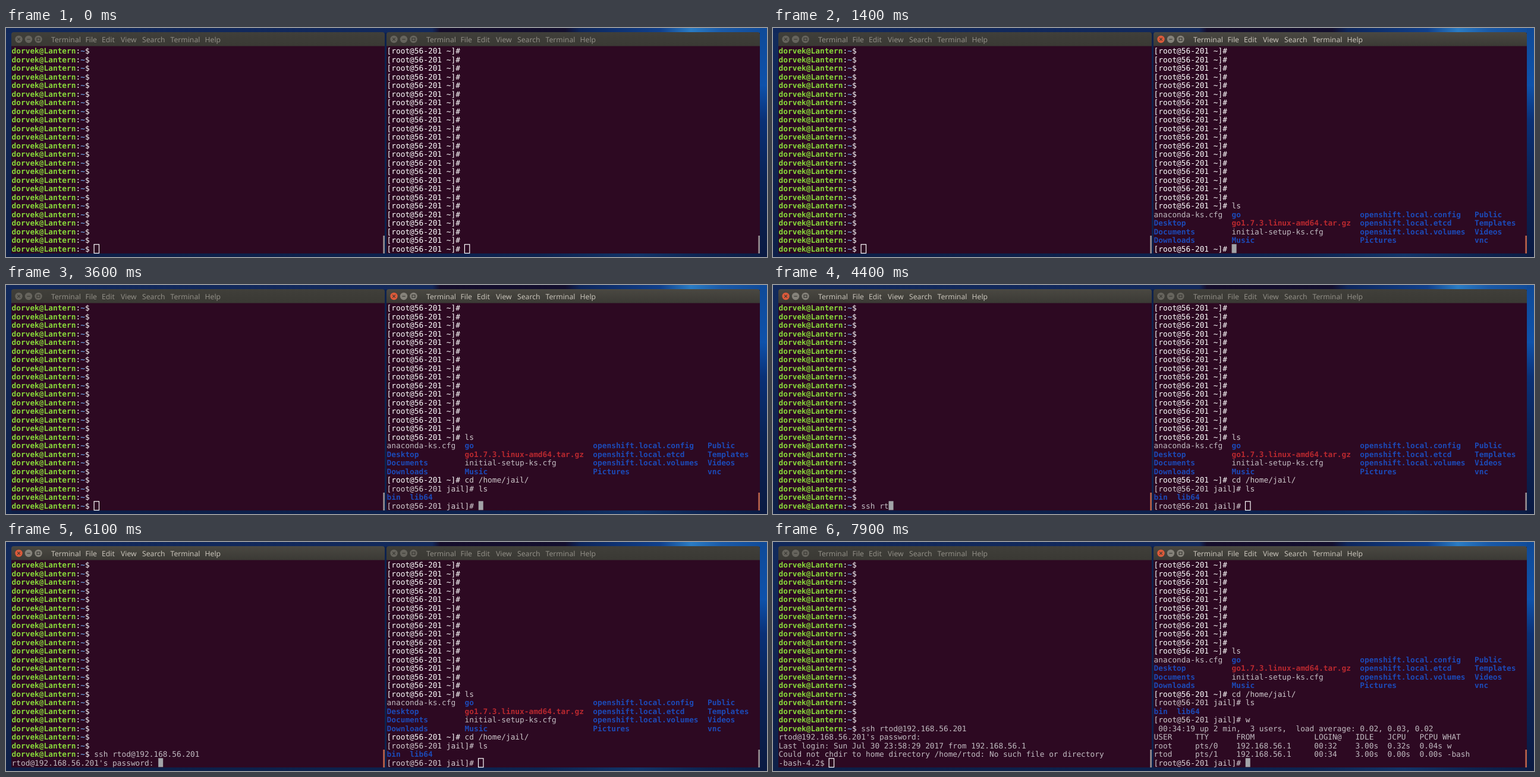
Recreate the animation shown at these times as an HTML page with a canvas. Size 1280 by 386 pixels, loop 8000 ms.

```html
<!DOCTYPE html>
<html lang="en">
<head>
<meta charset="utf-8">
<title>Two terminals</title>
<style>
  html, body { margin: 0; width: 100%; height: 100%; overflow: hidden; background: #0d1e46; }
  canvas { display: block; }
</style>
</head>
<body>
<canvas id="stage" width="1280" height="386"></canvas>
<script>
const ctx = document.getElementById('stage').getContext('2d');
const LOOP = 8000, ROWS = 24, CELL = 7.706, LINE = 14.49;
const MONO = '"DejaVu Sans Mono", monospace';
const WHITE = '#ffffff', GRAY = '#c2bcc2', GREEN = '#88d83a', TILDE = '#6a94cc';
const BLUE = '#1c4ab8', RED = '#b8282f';
const USER = 'dorvek', HOST = 'Lantern', GUEST = 'rtod';

// A terminal line is a list of runs placed on the character grid.
const run = (text, color = GRAY, col = 0, bold = false) => ({ text, color, col, bold });
const dir = (text, col) => run(text, BLUE, col, true);

function localPrompt(command = '') {
  const name = `${USER}@${HOST}`, n = name.length;
  return [run(name, GREEN, 0, true), run(':', WHITE, n), run('~', TILDE, n + 1, true),
          run('$', WHITE, n + 2), run(command, GRAY, n + 4)];
}

function rootPrompt(place = '~', command = '') {
  const text = `[root@56-201 ${place}]# `;
  return [run(text, place === '~' ? WHITE : '#d6cfd3'), run(command, '#d0cacd', text.length)];
}

const shellPrompt = () => [run('-bash-4.2$ ')];

const homeListing = [
  [run('anaconda-ks.cfg'), dir('go', 17), dir('openshift.local.config', 45), dir('Public', 70)],
  [dir('Desktop', 0), run('go1.7.3.linux-amd64.tar.gz', RED, 17, true), dir('openshift.local.etcd', 45), dir('Templates', 70)],
  [dir('Documents', 0), run('initial-setup-ks.cfg', GRAY, 17), dir('openshift.local.volumes', 45), dir('Videos', 70)],
  [dir('Downloads', 0), dir('Music', 17), dir('Pictures', 45), dir('vnc', 70)]
];
const jailListing = [[dir('bin', 0), dir('lib64', 5)]];
const sessions = [
  ' 00:34:19 up 2 min,  3 users,  load average: 0.02, 0.03, 0.02',
  'USER     TTY      FROM             LOGIN@   IDLE   JCPU   PCPU WHAT',
  'root     pts/0    192.168.56.1     00:32    3.00s  0.32s  0.04s w',
  `${GUEST}     pts/1    192.168.56.1     00:34    3.00s  0.00s  0.00s -bash`
].map(text => [run(text)]);
const passwordLine = [run(`${GUEST}@192.168.56.201's password: `)];
const welcome = [
  'Last login: Sun Jul 30 23:58:29 2017 from 192.168.56.1',
  `Could not chdir to home directory /home/${GUEST}: No such file or directory`
].map(text => [run(text)]);

// Commands are typed from `start` to `end`; the output follows at `enter`.
const rightSteps = [
  { prompt: c => rootPrompt('~', c), command: 'ls', start: 1000, end: 1200, enter: 1300, output: homeListing },
  { prompt: c => rootPrompt('~', c), command: 'cd /home/jail/', start: 1700, end: 2700, enter: 2900, output: [] },
  { prompt: c => rootPrompt('jail', c), command: 'ls', start: 3100, end: 3300, enter: 3400, output: jailListing },
  { prompt: c => rootPrompt('jail', c), command: 'w', start: 7500, end: 7600, enter: 7700, output: sessions },
  { prompt: c => rootPrompt('jail', c), command: '', start: LOOP, end: LOOP, enter: LOOP }
];
const leftSteps = [
  { prompt: localPrompt, command: `ssh ${GUEST}@192.168.56.201`, start: 4200, end: 5100, enter: 5400, output: [] },
  { prompt: () => passwordLine, command: '', start: 5400, end: 5400, enter: 6400, output: welcome },
  { prompt: shellPrompt, command: '', start: LOOP, end: LOOP, enter: LOOP }
];

function typed({ command, start, end }, t) {
  if (t < start) return '';
  if (t >= end) return command;
  return command.slice(0, 1 + Math.floor((t - start) / (end - start) * command.length));
}

function screenAt(steps, idlePrompt, t) {
  const lines = Array.from({ length: ROWS - 1 }, () => idlePrompt());
  for (const step of steps) {
    lines.push(step.prompt(typed(step, t)));
    if (t < step.enter) break;
    lines.push(...step.output);
  }
  return lines.slice(-ROWS);
}

function gradient(x0, y0, x1, y1, stops) {
  const g = ctx.createLinearGradient(x0, y0, x1, y1);
  stops.forEach(([at, color]) => g.addColorStop(at, color));
  return g;
}

function rect(x, y, w, h, fill) {
  ctx.fillStyle = fill;
  ctx.fillRect(x, y, w, h);
}

function drawDesktop() {
  rect(0, 0, 1280, 386, gradient(0, 0, 1280, 0, [
    [0, '#0d1e46'], [0.7, '#0d2350'], [0.83, '#113468'], [0.92, '#0d2350'], [1, '#0b1c44']]));
  rect(0, 0, 10, 386, gradient(0, 0, 0, 386, [[0, '#122a5c'], [1, '#0e2048']]));
  rect(0, 0, 1280, 8, gradient(0, 0, 1280, 0, [
    [0, '#11285a'], [0.56, '#12295c'], [0.57, '#150d2b'], [0.735, '#130f2e'],
    [0.755, '#0d265c'], [0.86, '#10408c'], [0.9, '#2a7cc4'], [0.94, '#1a5aa8'], [1, '#0f4a98']]));
  rect(1268, 0, 12, 386, gradient(0, 0, 0, 386, [
    [0, '#0f4a98'], [0.25, '#0e52ab'], [0.4, '#0a3177'], [0.65, '#0a2458'], [1, '#0a1a42']]));
}

function drawButtons(x, active) {
  const dark = '#3a3934';
  [12.5, 29, 45.5].forEach((dx, i) => {
    const cx = x + dx, cy = 19;
    ctx.fillStyle = active ? (i ? '#85827a' : '#dc5a3a') : '#66645d';
    ctx.beginPath();
    ctx.arc(cx, cy, 6.2, 0, Math.PI * 2);
    ctx.fill();
    ctx.strokeStyle = dark;
    ctx.lineWidth = 1.2;
    ctx.beginPath();
    if (i === 0) {
      ctx.moveTo(cx - 2.3, cy - 2.3); ctx.lineTo(cx + 2.3, cy + 2.3);
      ctx.moveTo(cx + 2.3, cy - 2.3); ctx.lineTo(cx - 2.3, cy + 2.3);
    } else if (i === 1) {
      ctx.moveTo(cx - 2.7, cy); ctx.lineTo(cx + 2.7, cy);
    } else {
      ctx.rect(cx - 2.5, cy - 2.2, 5, 4.4);
    }
    ctx.stroke();
  });
}

const menu = [['Terminal', 67], ['File', 124.5], ['Edit', 152], ['View', 184],
              ['Search', 220], ['Terminal', 267.5], ['Help', 325.5]];

function drawCursor(x, y, active) {
  if (active) return rect(x, y, 8, 15, '#a2a4a8');
  ctx.strokeStyle = WHITE;
  ctx.lineWidth = 1.2;
  ctx.strokeRect(x - 0.2, y + 0.5, 8.4, 14.8);
}

function drawTitleBar(x, active) {
  ctx.fillStyle = gradient(0, 7, 0, 30, active
    ? [[0, '#4a4842'], [1, '#3b3a35']] : [[0, '#403f3a'], [1, '#3a3934']]);
  ctx.beginPath();
  ctx.roundRect(x, 7, 628, 23.5, [4, 4, 0, 0]);
  ctx.fill();
  drawButtons(x, active);
  ctx.font = '12.2px "Noto Sans", sans-serif';
  ctx.fillStyle = active ? '#c8c3b9' : '#918e86';
  menu.forEach(([label, dx]) => ctx.fillText(label, x + dx, 24));
}

function drawWindow(x, lines, active) {
  rect(x, 30, 628, 350, '#2d0922');
  drawTitleBar(x, active);

  const left = x + 0.6;
  lines.forEach((line, row) => {
    for (const { text, color, col, bold } of line) {
      ctx.font = `${bold ? 'bold ' : ''}12.8px ${MONO}`;
      ctx.fillStyle = color;
      ctx.fillText(text, left + col * CELL, 43.4 + row * LINE);
    }
  });
  const last = lines[ROWS - 1].at(-1);
  drawCursor(left + (last.col + last.text.length) * CELL, 364.3, active);
  rect(x + 625.3, 350, 2.7, 30, active ? '#b9624a' : '#968d90');
}

function drawPointer(x, y) {
  ctx.strokeStyle = '#b5b0b5';
  ctx.lineWidth = 1.2;
  ctx.beginPath();
  ctx.moveTo(x - 3, y - 6.5); ctx.lineTo(x + 3, y - 6.5);
  ctx.moveTo(x, y - 6.5); ctx.lineTo(x, y + 6.5);
  ctx.moveTo(x - 3, y + 6.5); ctx.lineTo(x + 3, y + 6.5);
  ctx.stroke();
}

function focusAt(t) {
  if (t < 500) return 'none';
  return t >= 4000 && t < 7250 ? 'left' : 'right';
}

function draw(t) {
  const focus = focusAt(t);
  ctx.textRendering = 'geometricPrecision';
  drawDesktop();
  drawWindow(9, screenAt(leftSteps, localPrompt, t), focus === 'left');
  drawWindow(640, screenAt(rightSteps, rootPrompt, t), focus === 'right');
  if (t >= 6900 && t < 7200) drawPointer(604.5, 281);
}

const begin = performance.now();
function tick() {
  draw((performance.now() - begin) % LOOP);
  requestAnimationFrame(tick);
}
tick();
</script>
</body>
</html>
```
